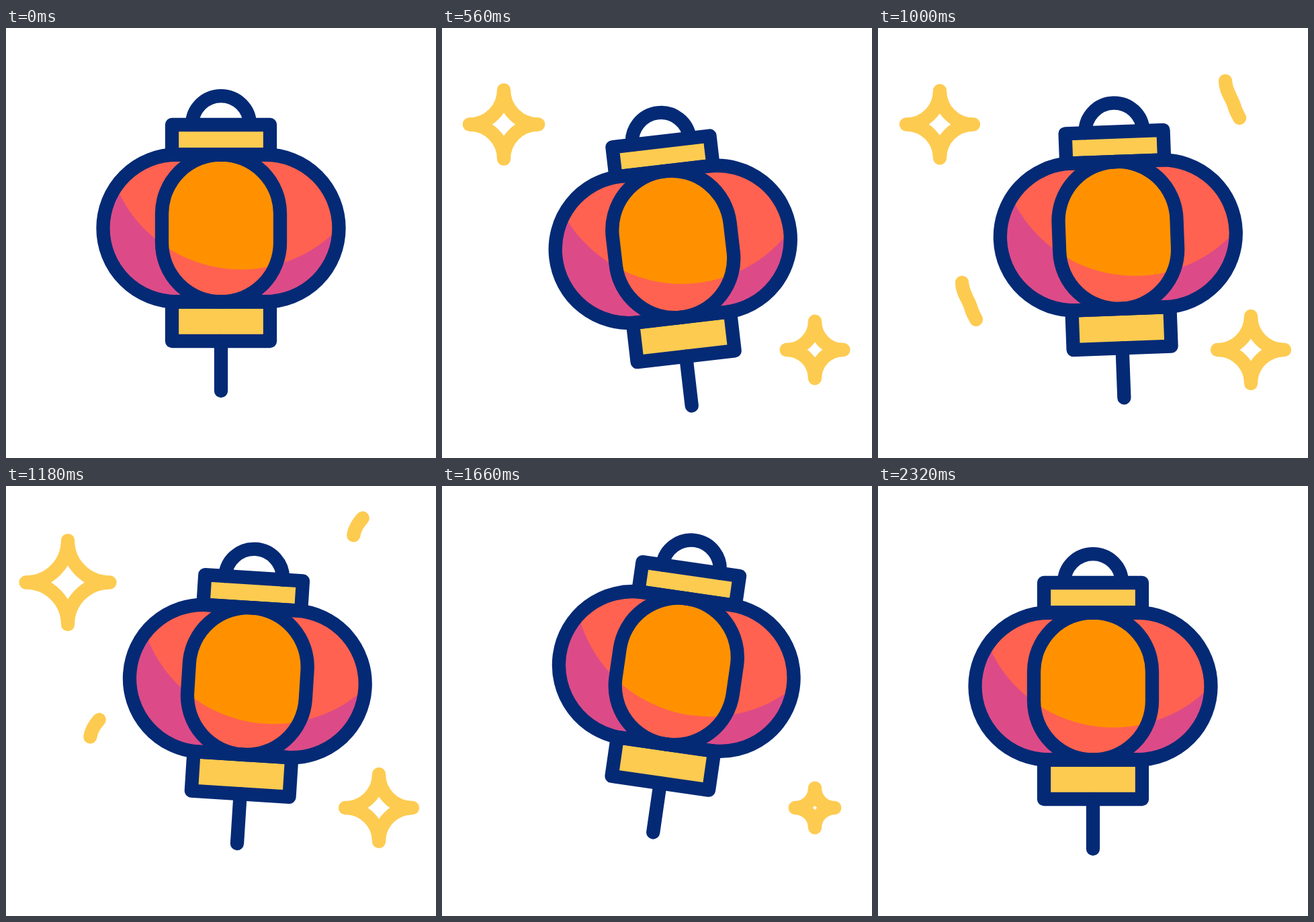
An HTML page that plays this animation: 640x640 px, repeating every 2.4 s.

```html
<!DOCTYPE html>
<html lang="en">
<head>
<meta charset="utf-8">
<title>Lantern</title>
<style>
  html, body { margin: 0; width: 100%; height: 100%; overflow: hidden; background: #fff; }
  svg { display: block; width: 100vw; height: 100vh; }
  .ink, .gold { fill: none; stroke-width: 20.3; stroke-linecap: round; stroke-linejoin: round; }
  .ink { stroke: #042a75; }
  .gold { stroke: #fdcb50; }
</style>
</head>
<body>
<svg viewBox="0 0 640 640">
  <defs>
    <rect id="body" x="144.5" y="188.5" width="351" height="219" rx="109.5"/>
    <rect id="panel" x="232" y="188.5" width="176" height="219" rx="88"/>
    <path id="caps" d="M247 144H393V188.5H247ZM247 407.5H393V466H247Z"/>
    <circle id="light" cx="350" cy="157.5" r="202"/>
    <path id="wave" pathLength="1000" d="M521 192C534 184 544 171 544 155S534 130 530.5 117S517 94 517 78S529 48 541 38"/>
    <clipPath id="inBody"><use href="#body"/></clipPath>
    <clipPath id="inPanel"><use href="#panel"/></clipPath>
  </defs>

  <g class="gold">
    <path id="starA" transform="translate(92 143.5)"/>
    <path id="starB" transform="translate(555 479)"/>
    <g id="waves">
      <use href="#wave"/>
      <use href="#wave" x="-392" y="300"/>
    </g>
  </g>

  <g id="lantern">
    <use href="#caps" fill="#fdcb50"/>
    <use href="#body" fill="#dc4b87"/>
    <g clip-path="url(#inBody)"><use href="#light" fill="#ff6250"/></g>
    <use href="#panel" fill="#ff6250"/>
    <g clip-path="url(#inPanel)"><use href="#light" fill="#ff9100"/></g>
    <g class="ink">
      <path d="M277 144A43 43 0 0 1 363 144M320 466V540"/>
      <use href="#caps"/>
      <use href="#body"/>
      <use href="#panel"/>
    </g>
  </g>
</svg>
<script>
  const LOOP = 2400, STEP = 20, LAG = 260;
  const LOW = 710, HIGH = 1480, HOME = 2320, FAR = 1250;
  const $ = id => document.getElementById(id);

  const progress = (t, t0, t1) => Math.min(1, Math.max(0, (t - t0) / (t1 - t0)));
  const ease = (t, t0, t1) => {
    const p = progress(t, t0, t1);
    return p * p * (3 - 2 * p);
  };
  const easeOut = (t, t0, t1) => 1 - (1 - progress(t, t0, t1)) ** 2;

  // Rest -> low -> high -> rest, the same timing for height and tilt.
  const swing = (t, low, high) =>
    low * ease(t, 0, LOW) + (high - low) * ease(t, LOW, HIGH) - high * ease(t, HIGH, HOME);

  // Out to the right and back.
  function drift(t) {
    return t < FAR
      ? 39.5 * (1 - (1 - progress(t, 0, FAR)) ** 2) ** 1.4
      : 39.5 * (1 - progress(t, FAR, HOME) ** 2) ** 2;
  }

  // Two pulses, then gone.
  const starSize = t => 68 * (ease(t, 160, 400) - ease(t, 1270, 1508))
    - 18 * (ease(t, 400, 590) - ease(t, 1000, 1285));

  function drawStar(el, r) {
    el.style.display = r > 0.1 ? '' : 'none';
    const arc = `A${r} ${r} 0 0 0 `;
    el.setAttribute('d', `M0 ${-r}${arc}${r} 0${arc}0 ${r}${arc}${-r} 0${arc}0 ${-r}Z`);
  }

  function drawWaves(el, from, to) {
    el.style.display = to > 0 && from < 0.99 ? '' : 'none';
    el.setAttribute('stroke-dasharray', `${Math.max(0.1, (to - from) * 1000)} 3000`);
    el.setAttribute('stroke-dashoffset', -from * 1000);
  }

  function draw(t) {
    const x = 320 + drift(t), y = 298 + swing(t, 27, -25), tilt = swing(t, -7.5, 9.3);
    $('lantern').setAttribute('transform',
      `translate(${x} ${y}) rotate(${tilt}) translate(-320 -298)`);
    drawStar($('starA'), starSize(t));
    drawStar($('starB'), starSize(t - LAG));
    drawWaves($('waves'), ease(t, 700, 1410), easeOut(t, 650, 1390));
  }

  const start = performance.now();
  function tick() {
    const t = (performance.now() - start) % LOOP;
    draw(Math.floor(t / STEP) * STEP);
    requestAnimationFrame(tick);
  }
  draw(0);
  requestAnimationFrame(tick);
</script>
</body>
</html>
```
